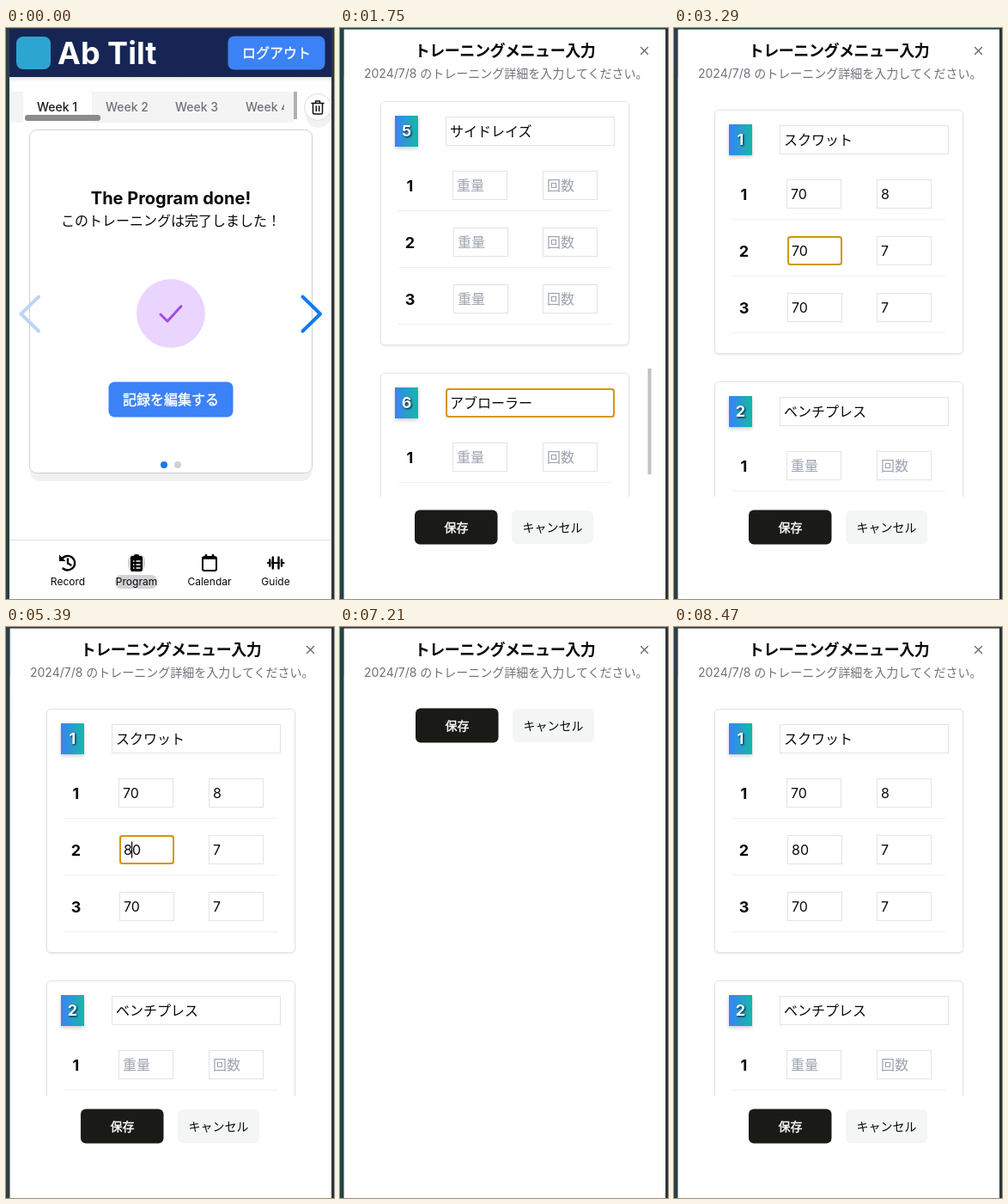
Write an HTML page that moves like this. It is 382 by 664 pixels and loops after 9.94 s.

```html
<!DOCTYPE html>
<html lang="ja">
<head>
<meta charset="utf-8">
<title>Training log</title>
<style>
  html, body { margin: 0; width: 100%; height: 100%; overflow: hidden; background: #27404a; }
  svg { display: block; width: 382px; height: 664px; }
  text { font: 400 16px Inter, "Noto Sans CJK JP", "Noto Sans CJK", sans-serif; fill: #09090b; white-space: pre; }
  .mid { text-anchor: middle; }
  .white { fill: #fff; }
  .brand { font-size: 36px; font-weight: 700; }
  .medium { stroke: #fff; stroke-width: .4px; }
  .tab { font-size: 14px; font-weight: 500; fill: #71717a; }
  .done { font-size: 20px; font-weight: 700; }
  .nav { font-size: 12px; }
  .heading { font-size: 18px; font-weight: 600; letter-spacing: -.025em; }
  .note { font-size: 14px; fill: #71717a; }
  .btn { font-size: 14px; }
  .num { font-size: 18px; font-weight: 700; text-anchor: middle; }
  .hint { fill: #9ca3af; }
  .field { fill: #fff; stroke: #e2e3e6; }
  .focus { fill: none; stroke: #d4960f; stroke-width: 2; }
  .card { fill: #fff; stroke: #e2e3e6; filter: drop-shadow(0 1px 1px rgba(0,0,0,.1)); }
  .badge { filter: drop-shadow(0 2px 2px rgba(0,0,0,.2)); }
  .badge-num { fill: #fff; filter: drop-shadow(1px 1px 1px rgba(0,0,0,.9)); }
  .line { fill: none; stroke-linecap: round; stroke-linejoin: round; }
</style>
</head>
<body>
<svg viewBox="0 0 382 664">
  <defs>
    <linearGradient id="blueTeal"><stop stop-color="#3b82f6"/><stop offset="1" stop-color="#14b8a6"/></linearGradient>
    <linearGradient id="fall" x2="0" y2="1"><stop stop-color="#000" stop-opacity=".1"/><stop offset="1" stop-color="#000" stop-opacity="0"/></linearGradient>
    <clipPath id="screen"><rect x="4" width="375" height="664"/></clipPath>
    <clipPath id="tabs"><rect x="4" y="70" width="320" height="44"/></clipPath>
    <clipPath id="listArea"><rect x="40" y="77" width="325" height="468"/></clipPath>
  </defs>
  <rect width="382" height="664" fill="#27404a"/>
  <rect x="379" width="3" height="664" fill="#2b363b"/>

  <g clip-path="url(#screen)">
    <rect x="4" width="375" height="664" fill="#fff"/>
    <g id="content">
      <rect x="4" y="74" width="332" height="36" rx="5" fill="#f4f4f5"/>
      <rect x="20" y="74" width="80" height="36" rx="3" fill="#fff"/>
      <g clip-path="url(#tabs)">
        <text class="tab" x="36" y="97" style="fill:#18181b">Week 1</text>
        <text class="tab" x="116" y="97">Week 2</text>
        <text class="tab" x="197" y="97">Week 3</text>
        <text class="tab" x="279" y="97">Week 4</text>
      </g>
      <rect x="22" y="101" width="88" height="7" rx="3" fill="#8b8b8b"/>
      <rect x="335" y="74" width="4" height="32" fill="#b0b0b0"/>
      <rect x="349" y="84" width="30" height="32" rx="15" fill="#f1f1f1"/>
      <circle cx="363" cy="92" r="15.5" fill="#fff" stroke="#dedede"/>
      <path class="line" stroke="#111" stroke-width="1.5" d="M356 87.500h14M360.500 87.500v-2.500h5v2.500M357.500 87.500v11q0 1.500 1.500 1.500h8q1.500 0 1.500-1.500v-11M361.300 91v5.500M364.700 91v5.500"/>

      <rect x="28" y="130" width="328" height="397" rx="12" fill="#f1f1f1"/>
      <rect x="27.500" y="118.500" width="329" height="399" rx="8" fill="#fff" stroke="#cfcfcf"/>
      <text class="done mid" x="192" y="205">The Program done!</text>
      <text x="64" y="229.500">このトレーニングは完了しました！</text>
      <circle cx="192" cy="332" r="40" fill="#e9d5ff"/>
      <path class="line" stroke="#a44be3" stroke-width="3" d="M180 333l8 8 16-17.500"/>
      <rect x="119.500" y="411.500" width="145" height="41" rx="7" fill="#3b82f6"/>
      <text class="white mid medium" x="192" y="438">記録を編集する</text>
      <circle cx="184" cy="508" r="4" fill="#147af0"/>
      <circle cx="200" cy="508" r="4" fill="#d0d0d0"/>
      <path class="line" stroke="#bcd5f8" stroke-width="4" d="M38 312.500L17.500 332.500 38 352.500"/>
      <path class="line" stroke="#147af0" stroke-width="4" d="M345.500 312.500L366 332.500 345.500 352.500"/>
    </g>

    <rect x="4" y="57" width="375" height="6" fill="url(#fall)"/>
    <rect x="4" width="375" height="57" fill="#172554"/>
    <rect x="12" y="10" width="40" height="38" rx="8" fill="#2da5d1"/>
    <text class="brand white" x="60" y="42">Ab Tilt</text>
    <rect x="258.500" y="9.500" width="113" height="39" rx="7" fill="#3b82f6"/>
    <text class="white mid medium" x="315" y="35">ログアウト</text>

    <rect x="4" y="595" width="375" height="69" fill="#fff"/>
    <rect x="4" y="595" width="375" height="1" fill="#e2e3e6"/>
    <path class="line" stroke="#000" stroke-width="2.400" d="M65 617.500A8.300 8.300 0 1 1 66.500 628.500M72 617.500v5l3.500 2"/>
    <path d="M62 612.500v7.500h7.500z"/>
    <rect x="142" y="612" width="20" height="20" rx="8" fill="#d2d2d5"/>
    <rect x="127" y="636" width="49" height="16" rx="7" fill="#d2d2d5"/>
    <rect x="145" y="614" width="14" height="18" rx="2" fill="#000"/>
    <rect x="149" y="612" width="6" height="5" rx="2" fill="#000"/>
    <path d="M148 620h1.500m2 0h5M148 624h1.500m2 0h5M148 628h1.500m2 0h5" stroke="#fff" stroke-width="1.300"/>
    <rect x="229" y="615" width="16" height="16" rx="2" fill="none" stroke="#000" stroke-width="2"/>
    <path d="M229 616.500h16M233 612v4M241 612v4" stroke="#000" stroke-width="2.500"/>
    <path class="line" d="M305 622h1M322.500 622h1M310 622h8" stroke="#000" stroke-width="2.200"/>
    <path class="line" d="M307.300 618.500v7M310.800 615.500v13M317.500 615.500v13M321 618.500v7" stroke="#000" stroke-width="2.400"/>
    <text class="nav mid" x="72" y="648">Record</text>
    <text class="nav mid" x="152" y="648">Program</text>
    <text class="nav mid" x="237" y="648">Calendar</text>
    <text class="nav mid" x="314" y="648">Guide</text>

    <rect id="shade" x="4" width="375" height="664" opacity="0"/>
    <g id="modal" opacity="0">
      <rect x="4.500" y="1.500" width="375" height="663" fill="#fff"/>
      <text class="heading mid" x="192" y="33">トレーニングメニュー入力</text>
      <text class="note" x="28" y="57.500">2024/7/8 のトレーニング詳細を入力してください。</text>
      <path class="line" stroke="#666" stroke-width="1.300" d="M350.500 22.500l8 8m0-8l-8 8"/>
      <g id="listBox" clip-path="url(#listArea)">
        <g id="list"></g>
        <rect id="thumb" x="358.500" y="78" width="4" height="123" fill="#c1c1c1"/>
      </g>
      <g id="actions">
        <rect id="save" x="87" y="560.500" width="96.500" height="40" rx="6" fill="#1a1a17"/>
        <text class="btn white mid medium" x="135.500" y="586">保存</text>
        <rect x="200" y="561" width="95" height="39" rx="6" fill="#f4f5f5"/>
        <text class="btn mid" x="247.500" y="586">キャンセル</text>
      </g>
    </g>
  </g>
  <rect width="382" height="1" fill="#2f4147"/>
</svg>
<script>
const LOOP = 9940, TICK = 70, PITCH = 316;
const $ = id => document.getElementById(id);

const names = ['スクワット', 'ベンチプレス', 'デッドリフト', 'ラットプルダウン', 'サイドレイズ', 'アブローラー'];
const firstSets = [['70', '8'], ['<tspan id="weight">70</tspan>', '7'], ['70', '7']];

const box = (x, y, w) =>
  `<rect class="field" x="${x + .5}" y="${y + .5}" width="${w - 1}" height="33"/>`;
const ring = (id, x, y, w) =>
  `<rect id="${id}" class="focus" x="${x + 1}" y="${y + 1}" width="${w - 2}" height="32" rx="3"/>`;
const cell = (x, y, value, hint) => box(x, y, 64) +
  `<text x="${x + 5}" y="${y + 23}" class="${value ? '' : 'hint'}">${value || hint}</text>`;

function setRow(r, [weight, reps] = []) {
  const y = 81 + 66 * r;
  return `<text class="num" x="81.500" y="${y + 23.5}">${r + 1}</text>` +
    cell(r ? 132 : 131, y, weight, '重量') + cell(236, y, reps, '回数') +
    `<rect x="67" y="${y + 46}" width="250" height="1" fill="#f1f1f2"/>`;
}

function card(name, i) {
  const sets = i ? [] : firstSets;
  return `<g transform="translate(0 ${95 + PITCH * i})">
    <rect class="card" x="47.500" y=".5" width="289" height="283" rx="5"/>
    <rect class="badge" x="64" y="17" width="27" height="36" fill="url(#blueTeal)"/>
    <text class="num badge-num" x="77.500" y="41">${i + 1}</text>
    ${box(123, 18, 197)}<text x="128" y="41">${name}</text>
    ${[0, 1, 2].map(r => setRow(r, sets[r])).join('')}</g>`;
}

$('list').innerHTML = names.map(card).join('') +
  ring('nameRing', 123, 113 + PITCH * 5, 197) + ring('weightRing', 132, 242, 64) +
  '<rect id="caret" y="249.500" width="1.200" height="19"/>';

// Each track holds [start, value] pairs; a value stays until the next start.
const tracks = {
  pageY: [[0, 0], [6370, -40]],
  open: [[0, 0], [980, .4], [1050, 1], [6300, .45], [6370, 0], [7140, .4], [7210, 1]],
  loaded: [[0, 0], [1190, 1], [6370, 0], [7350, 1]],
  scroll: [[0, 1399], [1750, 1274], [1820, 780], [1890, 330], [1960, 80], [2030, 0],
    [6370, 1399], [7630, 1180], [7700, 560], [7770, 120], [7840, 0]],
  thumb: [[0, 0], [1750, 1], [2450, .65], [2520, .3], [2590, 0], [7630, 1], [8260, .65], [8330, .3], [8470, 0]],
  focus: [[0, 'name'], [2730, 'weight'], [5950, ''], [6370, 'name']],
  weight: [[0, '70'], [4060, '0'], [4340, '80']],
  caret: [[0, 0], [2730, 155.5], [3290, 0], [3360, 145.3], [3850, 0], [4060, 137], [4340, 146], [4900, 0], [5390, 146], [5880, 0]],
  save: [[0, '#1a1a17'], [5950, '#30302d'], [6370, '#1a1a17']]
};
const valueAt = (track, t) => track.findLast(([start]) => start <= t)[1];
const show = (id, on) => $(id).setAttribute('opacity', +on);
const move = (id, y, x = 0) => $(id).setAttribute('transform', `translate(${x} ${y})`);

function draw(t) {
  const s = {};
  for (const key in tracks) s[key] = valueAt(tracks[key], t);
  move('content', s.pageY);
  show('shade', .8 * s.open);
  show('modal', s.open);
  $('modal').setAttribute('transform', `translate(192 332) scale(${.95 + .05 * s.open}) translate(-192 -332)`);
  show('listBox', s.loaded);
  move('actions', s.loaded ? 0 : -466, s.loaded ? 0 : 1);
  move('list', -s.scroll);
  move('thumb', s.scroll * .2496);
  show('thumb', s.thumb);
  show('nameRing', s.focus === 'name');
  show('weightRing', s.focus === 'weight');
  show('caret', s.caret > 0);
  $('caret').setAttribute('x', s.caret);
  $('weight').textContent = s.weight;
  $('save').setAttribute('fill', s.save);
}

function frame() {
  const t = performance.now() % LOOP;
  draw(t - t % TICK);
  requestAnimationFrame(frame);
}
frame();
</script>
</body>
</html>
```
